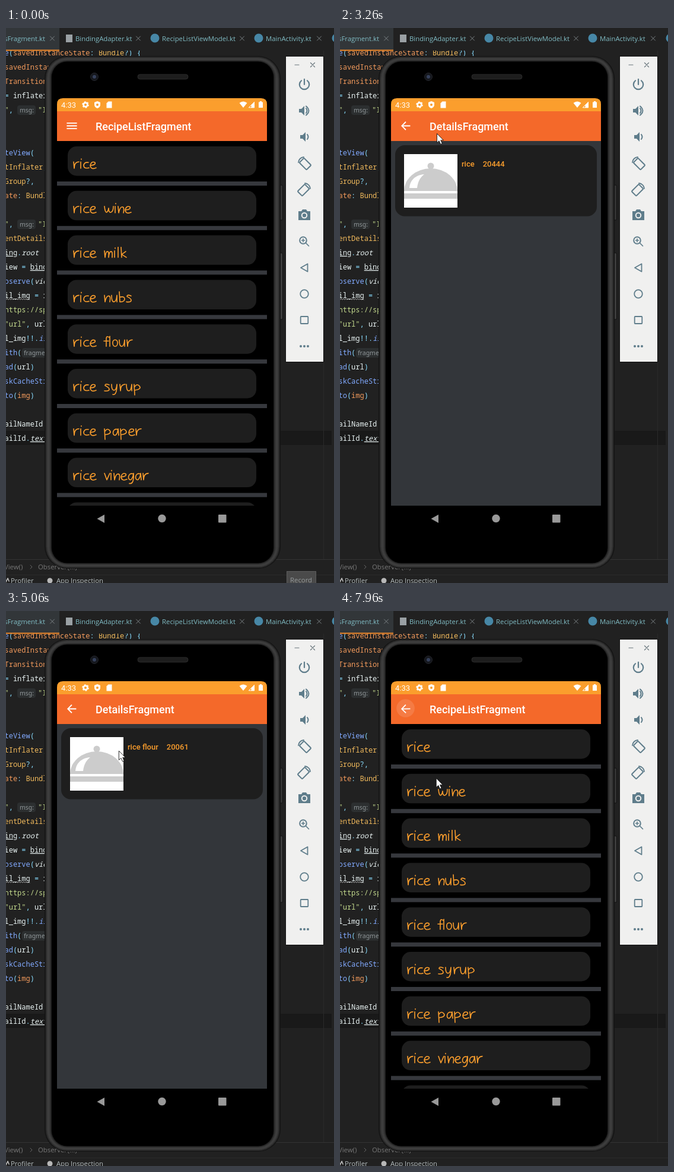
These frames come from a looping animation (553 by 933 pixels, 8 s). An HTML page:

```html
<!DOCTYPE html>
<html lang="en">
<head>
<meta charset="utf-8">
<title>Recipe list</title>
<style>
html, body { margin: 0; width: 100%; height: 100%; overflow: hidden; background: #212121; }
svg { display: block; width: 553px; height: 933px; }
text { white-space: pre; }
.ui { font: 11.35px "Open Sans", "Noto Sans", sans-serif; }
.code { font: 12px "Noto Sans Mono", monospace; }
.app { font-family: Roboto, sans-serif; font-weight: 500; }
.hint { font: 10.5px "Noto Sans", sans-serif; fill: #8f9698; }
.line { fill: none; stroke-linecap: round; stroke-linejoin: round; }
</style>
</head>
<body>
<svg id="stage" viewBox="0 0 553 933"></svg>
<script>
const LOOP = 8000;
const W = '#e8f2f2', B = '#82aaff', O = '#f29a5c', Y = '#f0b95c', G = '#c3d98d', C = '#89ddff';

const rect = (x, y, w, h, fill, r = 0, more = '') =>
  `<rect x="${x}" y="${y}" width="${w}" height="${h}" rx="${r}" fill="${fill}" ${more}/>`;
const disc = (x, y, r, fill, more = '') => `<circle cx="${x}" cy="${y}" r="${r}" fill="${fill}" ${more}/>`;
const path = (d, fill, more = '') => `<path d="${d}" fill="${fill}" ${more}/>`;
const label = (x, y, s, fill, cls = 'ui', more = '') =>
  `<text x="${x}" y="${y}" fill="${fill}" class="${cls}" ${more}>${s}</text>`;
const line = (d, color, width, more = '') =>
  `<path class="line" d="${d}" stroke="${color}" stroke-width="${width}" ${more}/>`;

// A code line is [middle y, colour, text, colour, text, ...]; "_" underlines, "/" slants.
function codeLine([y, ...parts]) {
  let spans = '';
  for (let i = 0; i < parts.length; i += 2) {
    const [color, ...flags] = parts[i].split(' ');
    const style = (flags.includes('_') ? 'text-decoration="underline" ' : '') +
      (flags.includes('/') ? 'font-style="italic"' : '');
    spans += `<tspan fill="${color}" ${style}>${parts[i + 1]}</tspan>`;
  }
  return label(-2.5, y + 4, spans, W, 'code');
}

function editor() {
  const lines = [
    [42, B, 'e', C, '(', O, 'savedInstanceState', C, ': ', Y, 'Bundle', C, '?) {'],
    [66, O, 'savedInstanc'], [90, O, 'Transition'], [114, C, '= ', W, 'inflater'],
    [138, G, '"', C, ','], [210, B, 'teView', C, '('], [234, Y, 'tInflater', C, ','],
    [258, Y, 'Group', C, '?,'], [282, O, 'ate', C, ': ', Y, 'Bundl'],
    [330, G, '"', C, ','], [354, Y, 'entDetails'], [378, W + ' _', 'ing', C, '.', W + ' /', 'root'],
    [402, W, 'iew ', C, '= ', W + ' _', 'bind'], [426, B, 'bserve', C, '(', W + ' /', 'view'],
    [450, W, 'il_img ', C, '= ', W, 'i'], [474, G, 'https://sp'],
    [498, G, '"url"', C, ', ', W, 'url'], [522, W, 'l_img', C, '!!.', B + ' /', 'is'],
    [546, B, 'ith', C, '('], [570, B, 'ad', C, '(', W, 'url', C, ')'],
    [594, B, 'skCacheStr'], [618, B, 'to', C, '(', O, 'img', C, ')'],
    [666, W, 'ailNameId', C, '.'], [690, W, 'ailId', C, '.', W + ' _ /', 'text']
  ];
  const msg = y => rect(19, y - 8, 31, 16, '#2c2f30', 4) + label(23, y + 3.5, 'msg:', '', 'hint') +
    label(54, y + 4, '"I', G, 'code');
  let wave = 'M0 457';
  for (let x = 0; x < 38; x += 4) wave += 'l2-2l2 2';
  return rect(0, 677, 549, 24, '#191919') + lines.map(codeLine).join('') + msg(138) + msg(330) +
    rect(27, 538, 45, 16, '#2c2f30', 4) + label(30, 549.5, 'fragment', '', 'hint') +
    line(wave, '#b8b8b8', 0.8) + rect(535, 38, 1, 855, '#2a2a2a');
}

function tabs() {
  const names = [[-3, 'sFragment.kt', 78], [117, 'BindingAdapter.kt', 223],
    [263, 'RecipeListViewModel.kt', 398], [438, 'MainActivity.kt', 528]];
  return rect(0, 0, 553, 38, '#212121') + rect(0, 0, 90, 38, '#323639') + rect(0, 36.5, 90, 2, '#f08a2c') +
    names.map(([x, s, cross]) => label(x, 21.5, s, '#80bcc4') +
      line(`M${cross - 3.5} 14l7 7m0-7l-7 7`, '#7b8285', 1)).join('') +
    rect(101, 11, 11, 13, '#9aa0a4') +
    [251, 426, 557].map(x => disc(x, 17, 7.5, '#4787a6')).join('');
}

function footer() {
  return rect(0, 893, 553, 40, '#212121') + rect(0, 893, 553, 1, '#343434') +
    label(-3, 910, 'View()', '#777') + line('M41 903l3 3l-3 3', '#666', 1) +
    label(54, 910, 'Observer{...}', '#777') + rect(0, 919, 553, 1, '#2b2b2b') +
    line('M-1 933l4-8l2 5', '#c8c8c8', 1.5) + label(8, 933, 'Profiler', '#b4bcbe') +
    disc(74, 929, 4.5, '#b8b8b8') + label(85, 933, 'App Inspection', '#b4bcbe') +
    `<g id="record">${rect(473.5, 913.5, 49, 22, '#4a4a4a', 0, 'stroke="#5c5c5c"')}
     ${label(479, 932, 'Record', '#969b9d')}</g>`;
}

function phone() {
  let bevel = '';
  for (let d = 0; d <= 12; d++) {
    const shade = Math.round(18 + 44 * Math.sin(Math.PI * d / 12));
    const fill = d < 12 ? `rgb(${shade},${shade},${shade})` : '#000';
    bevel += rect(65 + d, 47 + d * 0.8, 398 - 2 * d, 862 - 1.6 * d, fill, 38 - d);
  }
  return rect(462, 264, 4.5, 59, '#333', 2, 'stroke="#111"') + rect(462, 378, 4.5, 112, '#3c3c3c', 2, 'stroke="#111"') +
    bevel + disc(149, 82, 6.5, '#15171d', 'stroke="#24262b"') + disc(149, 82, 3, '#35405a') +
    rect(222, 78, 85, 8, '#1d1d1d', 4, 'stroke="#2b2b2b"') +
    path('M153.5 825L166 818V832Z', '#999') + disc(263, 824.5, 6.7, '#999') + rect(358, 818, 13.5, 13.5, '#999', 1);
}

function panel() {
  const c = '#5f7d8b';
  const speaker = y => path(`M494 ${y - 3}h4l5-5v16l-5-5h-4z`, c);
  const turn = (y, flip) => `<g transform="translate(503 ${y}) scale(${flip} 1)">
    ${rect(-5.5, -8.5, 11, 17, 'none', 1.5, `stroke="${c}" stroke-width="2" transform="translate(1.5 1.5) rotate(-45)"`)}
    ${line('M-10-1Q-9-9-1-10', c, 1.8)}</g>`;
  return rect(471.5, 47.5, 64, 514, '#f0f0ef', 0, 'stroke="#111"') +
    line('M487 62h7M513.5 58.5l7 7m0-7l-7 7', '#68757b', 1.2) +
    line('M503 86v9M498 88.5A8.2 8.2 0 1 0 508 88.5', c, 2.2) +
    speaker(139) + line('M506 135Q509 139 506 143M506 131.5Q515 139 506 146.5', c, 2) +
    `<g transform="translate(2 0)">${speaker(183)}</g>` + line('M508 179Q511 183 508 187', c, 2) +
    turn(227, 1) + turn(271, -1) +
    path('M493 308h5l2-3h6l2 3h5v15h-20z', c) + disc(503, 315, 4.2, 'none', 'stroke="#f0f0ef" stroke-width="2"') +
    disc(501, 357, 5.8, 'none', `stroke="${c}" stroke-width="2"`) + line('M505.5 361.5l5 5M498.5 357h5M501 354.5v5', c, 1.6) +
    line('M497 403L508.5 396.5V409.5Z', c, 1.8) + disc(503, 447, 6.8, 'none', `stroke="${c}" stroke-width="1.8"`) +
    rect(496.7, 485, 12.6, 12, 'none', 1, `stroke="${c}" stroke-width="1.8"`) +
    [497, 503, 509].map(x => disc(x, 535, 2, c)).join('');
}

function statusBar() {
  return path('M86 140V128Q86 118 96 118H430Q440 118 440 128V140Z', '#fb9e2d') +
    rect(86, 140, 354, 50, '#f4692a') +
    label(93, 133.5, '4:33', '#fff', 'app', 'font-size="13" style="font-weight:400"') +
    disc(134, 129, 3.4, 'none', 'stroke="#fff" stroke-width="2.6"') +
    disc(134, 129, 5, 'none', 'stroke="#fff" stroke-width="1.6" stroke-dasharray="2.6 2.6"') +
    path('M154 123l5 2v4q0 4-5 6q-5-2-5-6v-4z', '#fff') + disc(154, 129, 2, '#fb9e2d') +
    path('M172.5 123.5h6v11h-9v-8z', '#fff') +
    path('M393.5 126Q400 121 406.5 126L400 134Z', '#fff') + line('M409.5 133.5L418.5 124.5V133.5Z', '#fff', 1) +
    path('M413.5 129.5L419 124V134H413.5Z', '#fff') + path('M426 124.5h2v-1.5h3v1.5h2v9.5h-7z', '#fff');
}

// Handwriting strokes on a baseline of 0: [advance, path].
const glyphs = {
  r: [11, 'M1-11L2 0Q2-11 10-11'],
  i: [6, 'M2-11V0M3-16v1'],
  c: [11, 'M9-10Q1-11 1-4Q2 1 10-1'],
  e: [12, 'M2-5Q11-6 9-10Q3-13 1-5Q2 3 11-1'],
  w: [17, 'M1-11Q2 0 5-1 8-4 8-8Q8 0 12-1T16-11'],
  n: [12, 'M1-11L2 0Q4-10 8-10T10 0'],
  m: [16, 'M1-11L2 0Q3-10 6-10T8 0Q9-10 12-10T14 0'],
  l: [6, 'M2-17V0'],
  k: [11, 'M1-17L2 0M9-10L2-5L10 0'],
  u: [13, 'M1-11Q1 0 5 0T10-11V0'],
  b: [12, 'M1-17L2 0Q10 0 10-5T2-8'],
  s: [12, 'M9-10Q2-13 2-9Q10-5 9-2T1 0'],
  f: [8, 'M9-15Q4-19 4-12V0M0-9H8'],
  o: [11, 'M5-11C-1-11 0 0 5 0S11-11 5-11'],
  y: [14, 'M1-11Q1-1 5-1T10-11Q10 8 3 6'],
  p: [14, 'M1-11L2 7M2-7Q6-13 10-8T2-1'],
  a: [13, 'M9-10C1-13-1 0 5 0Q9-2 10-11L11 0'],
  v: [10, 'M1-11L5 0L10-11'],
  g: [12, 'M9-10C1-13-1 0 5 0Q9-2 10-11Q11 8 3 6'],
  ' ': [12, '']
};

function written(s, x, y) {
  const strokes = [...s].map(ch => {
    const [advance, d] = glyphs[ch], out = line(d, '#fb9e2d', 1.6, `transform="translate(${x} ${y})"`);
    x += advance;
    return out;
  });
  return `<g role="img" aria-label="${s}">${strokes.join('')}</g>`;
}

function list() {
  const kinds = ['', ' wine', ' milk', ' nubs', ' flour', ' syrup', ' paper', ' vinegar', null];
  return rect(86, 190, 354, 613, '#000') + kinds.map((kind, i) => {
    const y = i * 74.8;
    return rect(104, 199 + y, 318, 49.5, '#1e1e1e', 15) + rect(86, 258 + y, 354, 7, '#36383d') +
      (kind === null ? '' : written('rice' + kind, 113, 236 + y));
  }).join('');
}

function details() {
  return rect(86, 190, 354, 613, '#33363a') + rect(93, 197, 340, 119.5, '#1e1e1e', 16) +
    `<text x="205" y="233" class="app" font-size="13" fill="#fb9e2d"><tspan id="food"></tspan><tspan id="code" dx="14"></tspan></text>
    <g id="dish">${rect(108, 212, 90, 90, '#fff')}${disc(153, 232, 5.5, '#ccc')}
    ${path('M108 274A45 38 0 0 1 198 274Z', '#ccc')}
    ${path('M117 269C118 255 128 247 142 246C134 252 131 260 130 269Z', '#fff')}${rect(108, 278, 90, 9, '#ccc')}</g>`;
}

const stage = document.getElementById('stage');
stage.innerHTML = `<defs><clipPath id="screen"><rect x="86" y="118" width="354" height="685"/></clipPath></defs>
  ${rect(0, 0, 553, 933, '#212121')}${editor()}${tabs()}${footer()}${phone()}${panel()}
  <g clip-path="url(#screen)">${statusBar()}<g id="list">${list()}</g><g id="details">${details()}</g>
  ${disc(110.5, 163.5, 0, '#fff', 'id="ripple"')}${line('', '#fff', 1.8, 'id="menu" style="stroke-linecap:butt"')}
  ${label(151, 172, '', '#fff', 'app', 'id="title" font-size="18"')}</g>
  ${path('M0 0V15.5L3.6 12.2L6.3 18L8.9 16.8L6.3 11.2H11Z', '#fff', 'id="cursor" stroke="#111" stroke-width=".9"')}`;

const el = {};
for (const id of ['record', 'list', 'details', 'food', 'code', 'dish', 'ripple', 'menu', 'title', 'cursor'])
  el[id] = document.getElementById(id);

const visits = [
  { open: 1970, close: 3870, image: 2390, food: 'rice', code: '20444' },
  { open: 4570, close: 6145, image: 4710, food: 'rice flour', code: '20061' },
  { open: 7075, close: 7945, image: 7075, food: 'rice syrup', code: '93784' }
];
const presses = [3800, 6050, 7870];
const track = [
  [320, 499, 901], [560, 400, 610], [800, 240, 290], [1000, 142, 152], [1150, 139, 149],
  [1300, 124, 165], [1500, 150, 205], [1720, 200, 228], [1970, 206, 229], [2180, 254, 399],
  [2400, 285, 380], [2730, 294, 248], [2870, 294, 248], [3250, 165, 178], [3610, 114, 161],
  [3740, 114, 161], [3890, 244, 409], [4230, 200, 525], [4480, 200, 525], [4750, 235, 400],
  [5060, 190, 235], [5200, 232, 240], [5500, 150, 190], [5870, 107, 160], [6110, 107, 160],
  [6210, 153, 214], [6500, 200, 480], [6820, 214, 600], [7010, 214, 600], [7140, 230, 489],
  [7400, 180, 280], [7690, 112, 161], [7840, 112, 161], [7960, 162, 280], [8000, 170, 320]
];

const mix = (a, b, p) => a + (b - a) * p;
const clamp = v => Math.min(1, Math.max(0, v));
const smooth = v => (1 - Math.cos(Math.PI * clamp(v))) / 2;
const show = (node, on) => node.setAttribute('visibility', on ? 'visible' : 'hidden');

// Bars at p = 0, back arrow at p = 1, half a turn between.
function drawMenu(p) {
  const half = mix(8.6, 7.4, p), len = mix(17.2, 10.4, p), angle = p * Math.PI / 4;
  const off = mix(4.7, -0.6, p), dx = len * Math.cos(angle), dy = len * Math.sin(angle);
  el.menu.setAttribute('d', `M${-half + p} 0H${half}M${-half} ${off}l${dx} ${dy}M${-half} ${-off}l${dx} ${-dy}`);
  el.menu.setAttribute('transform', `translate(111 164.5) rotate(${-180 * (1 - p)})`);
}

function drawCursor(t) {
  show(el.cursor, t >= 320);
  const i = track.findIndex(point => point[0] > t);
  if (i < 1) return;
  const [t0, x0, y0] = track[i - 1], [t1, x1, y1] = track[i], p = (t - t0) / (t1 - t0);
  el.cursor.setAttribute('transform', `translate(${mix(x0, x1, p)} ${mix(y0, y1, p)})`);
}

function draw(t) {
  const visit = visits.find(v => t >= v.open && t < v.close);
  show(el.record, t < 70);
  show(el.list, !visit);
  show(el.details, visit);
  show(el.dish, visit && t >= visit.image);
  el.title.textContent = visit ? 'DetailsFragment' : 'RecipeListFragment';
  if (visit) {
    el.food.textContent = visit.food;
    el.code.textContent = visit.code;
  }
  drawMenu(visits.reduce((p, v) => p + smooth((t - v.open) / 300) - smooth((t - v.close) / 300), 0));
  const age = t - (presses.findLast(start => start <= t) ?? -LOOP);
  el.ripple.setAttribute('r', mix(13, 17, clamp(age / 160)));
  el.ripple.setAttribute('opacity', 0.22 * clamp(age / 160) * clamp((500 - age) / 300));
  drawCursor(t);
}

const start = performance.now();
function tick() {
  draw((performance.now() - start) % LOOP);
  requestAnimationFrame(tick);
}
tick();
</script>
</body>
</html>
```
